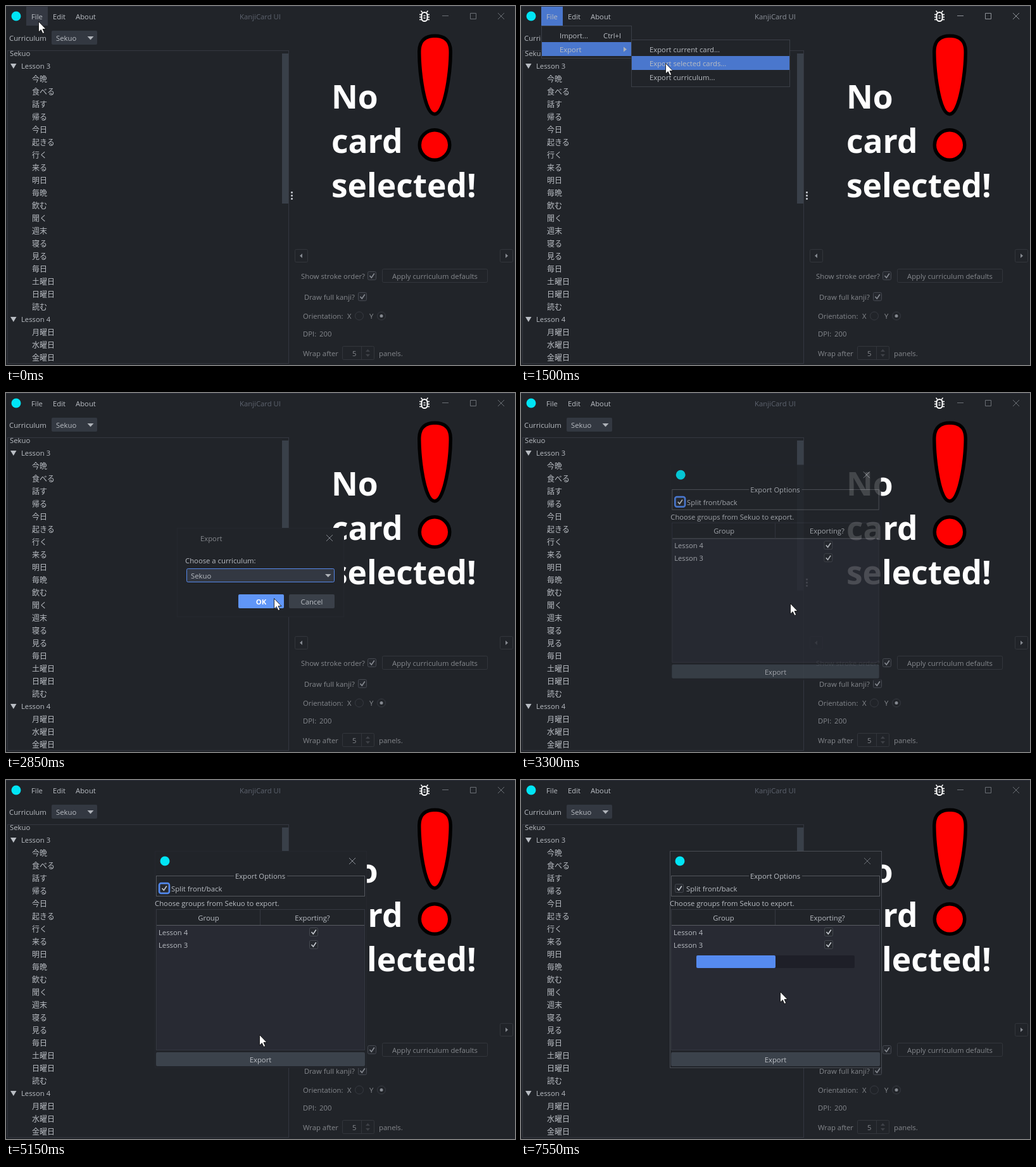
These frames come from a looping animation (804x567 px, 8000 ms). An HTML page:

```html
<!DOCTYPE html>
<html lang="en">
<head>
<meta charset="utf-8">
<title>KanjiCard UI</title>
<style>
html, body { margin: 0; height: 100%; overflow: hidden; background: #212429; }
svg { display: block; width: 804px; height: 567px; }
text { font: 11.3px "Open Sans", "Noto Sans", sans-serif; fill: #b9bdc3; white-space: pre; }
.jp { font: 12px "Noto Sans CJK JP", "Noto Sans CJK", sans-serif; }
.big { font: bold 51.5px "Noto Sans", sans-serif; fill: #fff; }
.off text, text.off { fill: #85888d; }
.bold { font-weight: bold; fill: #fff; }
.mid { text-anchor: middle; }
.line { fill: none; stroke: #b9bdc3; }
</style>
</head>
<body>
<svg id="stage" viewBox="0 0 804 567"></svg>
<script>
const CURRICULUM = 'Sekuo', BG = '#212429', BLUE = '#4a77cd';

// Markup helpers
const box = (x, y, w, h, fill, stroke, rx = 0, id = '') => {
  const d = stroke ? .5 : 0;
  return `<rect id="${id}" x="${x + d}" y="${y + d}" width="${w - 2 * d}" height="${h - 2 * d}" rx="${rx}" fill="${fill}" stroke="${stroke || 'none'}"/>`;
};
const text = (x, y, s, cls = '', id = '') => `<text id="${id}" x="${x}" y="${y}" class="${cls}">${s}</text>`;
const shape = (d, fill = '#aeb2b8') => `<path d="${d}" fill="${fill}"/>`;
const line = (d, color = '#b9bdc3', w = 1, id = '') => `<path id="${id}" class="line" d="${d}" style="stroke:${color};stroke-width:${w}"/>`;
const cross = (x, y, color, id) => line(`M${x - 5} ${y - 5}l10 10m0-10l-10 10`, color, 1, id);
const tick = (x, y, color = '#c4c8ce') => box(x, y, 14, 14, '#25282e', '#454950', 2) + line(`M${x + 3.5} ${y + 7}l2.8 3.2 4.5-6.6`, color, 1.7);
const group = (id, s, cls = '') => `<g id="${id}" class="${cls}">${s}</g>`;
const logo = (x, y) => `<circle cx="${x}" cy="${y}" r="7.5" fill="#00e5f5"/>`;

const words = ['今晩 食べる 話す 帰る 今日 起きる 行く 来る 明日 毎晩 飲む 聞く 週末 寝る 見る 毎日 土曜日 日曜日 読む',
  '月曜日 水曜日 金曜日'];
let rowY = 99;
const tree = words.map((list, i) => {
  let s = shape(`M7 ${rowY - 8}h9.5l-4.7 8z`, '#b9bdc3') + text(24, rowY, 'Lesson ' + (i + 3));
  for (const word of list.split(' ')) s += text(41, (rowY += 20) + .5, word, 'jp');
  rowY += 20;
  return s;
}).join('');

const topBar = line('M0 .5H804', '#2c2f3a') + logo(16, 16) +
  box(32, 1, 34, 30, '#343842', '', 0, 'fileBg') +
  text(40, 21, 'File') + text(74, 21, 'Edit') + text(110, 21, 'About') + text(401.5, 21, 'KanjiCard UI', 'mid', 'title') +
  line('M689 15.5h10M733.5 11.5h9v9h-9zM777 11l10 10m0-10l-10 10', '#6b6f75', 1, 'controls') +
  line('M657.5 10l-2-2.5M664.500 10l2-2.500M653 13.500h3.500m9 0h3.500M653 17.500h3.500m9 0h3.500M653 21.500h3.500m9 0h3.500M659.500 15.500h3M659.500 19h3', '#fff', 1.500) +
  '<rect x="656.500" y="10" width="9" height="14" rx="4.500" fill="none" stroke="#fff" stroke-width="2"/>';

const leftPane = text(5, 55, 'Curriculum') + box(72, 39, 72, 22, '#333841', '', 2) + text(79, 55, CURRICULUM) + shape('M128.500 48h10l-5 5.500z') +
  box(2, 70, 445, 495, 'none', '#343740') +
  `<clipPath id="list"><path d="M3 71h443v493H3z"/></clipPath><g clip-path="url(#list)">${text(6, 79, CURRICULUM)}${tree}</g>` +
  box(436, 75, 10, 237, '#394049') +
  [293, 298, 303].map(y => box(450, y, 3, 3, '#b9bdc3', '', 1)).join('');

const preview = ['No', 'card', 'selected!'].map((s, i) => text(514, 161.500 + 70 * i, s, 'big')).join('') +
  `<g fill="red" stroke="#000" stroke-width="11" style="paint-order:stroke">
  <path d="M655.500 72C655.500 55 665 50 677.500 50S699.500 55 699.500 72C699.500 110 689 168 677 168S655.500 110 655.500 72z"/>
  <circle cx="677" cy="219.500" r="21"/></g>`;

const dim = '#33363c', faint = '#858990';
const form = box(456, 384, 21, 21, 'none', dim, 2) + shape('M468 391v7l-4-3.500z', faint) +
  box(780, 384, 21, 21, 'none', dim, 2) + shape('M789 391v7l4-3.500z', faint) +
  text(466, 431, 'Show stroke order?') + tick(571, 419, faint) +
  box(594, 415, 167, 22, 'none', dim, 2) + text(677.500, 431, 'Apply curriculum defaults', 'mid') +
  text(471, 464, 'Draw full kanji?') + tick(556, 452, faint) +
  text(469, 494, 'Orientation:') + text(539, 494, 'X') + text(574, 494, 'Y') +
  `<g fill="none" stroke="#373a41"><circle cx="558" cy="489.500" r="6.500"/><circle cx="593" cy="489.500" r="6.500"/></g><circle cx="593" cy="489.500" r="2.500" fill="${faint}"/>` +
  text(469, 522, 'DPI:') + text(495, 522, '200') +
  text(469, 553, 'Wrap after') + box(531, 537, 51, 22, 'none', dim, 2) + line('M561.500 538v20', dim) +
  text(547, 553, '5') + shape('M568 546h7l-3.500-4zM568 550h7l-3.500 4z', '#3e4147') + text(589, 553, 'panels.');

const menu = box(32, 31, 143, 52, BG, '#3b3f47') + box(33, 35, 141, 22, BLUE, '', 0, 'menuRow') +
  text(61, 51, 'Import...') + text(130, 51, 'Ctrl+I') + text(61, 73, 'Export') + shape('M162 64.500v8l5-4z');

const submenu = box(174, 53, 251, 75, BG, '#3b3f47') + box(175, 57, 249, 22, BLUE, '', 0, 'subRow') +
  ['Export current card...', 'Export selected cards...', 'Export curriculum...'].map((s, i) => text(203, 73 + 22 * i, s)).join('');

const chooser = box(270, 213, 264, 141, BG, '#25272e') + text(307, 234, 'Export', 'off', 'chooserTitle') + cross(511, 229, '#858990') +
  text(283, 269, 'Choose a curriculum:') + box(285, 277, 234, 22, '#333842', '#5688ea', 2) +
  text(292, 293, CURRICULUM) + shape('M504 286h9.500l-4.700 5z') +
  box(367, 318, 72, 22, '#5688ea', '', 2, 'ok') + text(403, 334, 'OK', 'mid bold') +
  box(447, 318, 72, 22, '#3a4049', '', 2) + text(483, 334, 'Cancel', 'mid');

const options = box(235, 112, 335, 343, BG, '#25272e', 0, 'frame') + logo(251, 128) + cross(547, 128, '#8d9198', 'optClose') +
  box(237, 151, 330, 33, 'none', '#54575d') + box(360, 150, 84, 4, BG) + text(401.500, 156, 'Export Options', 'mid') +
  tick(243, 164) + group('focus', '<rect x="242" y="163" width="16" height="16" rx="3" fill="none" stroke="#5088f0" stroke-width="2.500"/>') +
  text(261, 176, 'Split front/back') + text(235, 199, `Choose groups from ${CURRICULUM} to export.`) +
  box(237, 204, 330, 223, '#282a33', '#353841') + box(238, 205, 328, 24, BG) +
  line('M238 229.500h328', '#595c62') + line('M401.500 205v24', '#353841') +
  text(320, 222, 'Group', 'mid') + text(484, 222, 'Exporting?', 'mid') +
  text(241, 245, 'Lesson 4') + tick(479, 233) + text(241, 265, 'Lesson 3') + tick(479, 253) +
  box(237, 430, 330, 22, '#3b424b', '', 2, 'export') + text(402, 446, 'Export', 'mid') +
  group('progress', box(277, 277, 250, 20, '#1e1f28', '', 2) + box(277, 277, 125, 20, '#568bf0', '', 2));

const pointer = '<path d="M.500 .500V17l3.800-3.500 2.700 6 2.700-1.200-2.700-5.800H12z" fill="#fff" stroke="#000" stroke-width=".8"/>';

document.getElementById('stage').innerHTML = box(0, 0, 804, 567, BG) + topBar + leftPane + preview + group('form', form, 'off') +
  group('menu', menu) + group('submenu', submenu) + group('chooser', chooser) + group('options', options) + group('pointer', pointer);

// Pointer path: time, x, y
const path = [[0, 51, 24], [650, 51, 24], [850, 56, 53], [950, 79, 60], [1050, 79, 60], [1350, 190, 64], [1600, 253, 108],
  [2350, 253, 108], [2850, 423, 324], [2900, 423, 324], [2950, 425, 332], [3600, 425, 332], [3900, 511, 269],
  [4100, 511, 269], [4250, 466, 300], [4600, 420, 436], [5100, 420, 436], [5500, 262, 165], [5850, 340, 425],
  [5950, 392, 436], [6150, 406, 442], [6900, 406, 442], [7350, 409, 335], [7500, 409, 335], [7550, 409, 334], [8000, 409, 334]];

const el = id => document.getElementById(id);
const set = (id, name, value) => el(id).setAttribute(name, value);
const show = (id, on) => el(id).style.display = on ? '' : 'none';
const clamp = v => Math.max(0, Math.min(1, v));
const easeIn = (t, start) => 1 - (1 - clamp((t - start) / 250)) ** 2;

function pointerAt(t) {
  const i = path.findIndex(p => p[0] > t), a = path[i - 1], b = path[i];
  const k = (t - a[0]) / (b[0] - a[0]);
  return [1, 2].map(n => Math.round(a[n] + (b[n] - a[n]) * k));
}

// Windows grow slightly while they fade in
function fade(id, alpha, cy) {
  show(id, alpha > 0);
  set(id, 'opacity', alpha);
  set(id, 'transform', `translate(402 ${cy}) scale(${.95 + .05 * alpha}) translate(-402 ${-cy})`);
}

function draw(now) {
  const t = Math.floor(now % 8000 / 50) * 50;
  const [x, y] = pointerAt(t);
  const within = (l, top, r, b) => x >= l && x < r && y >= top && y < b;
  const open = t >= 600 && t < 1900, active = open || t >= 3000 && t < 3150;

  set('pointer', 'transform', `translate(${x} ${y})`);
  show('fileBg', t < 1900);
  set('fileBg', 'fill', open ? BLUE : '#343842');
  el('title').style.fill = active ? '#8d929a' : '#5d636e';
  el('controls').style.stroke = active ? '#90949a' : '#6b6f75';

  show('menu', open);
  show('menuRow', y >= 34);
  set('menuRow', 'y', t >= 900 ? 57 : 35);
  show('submenu', open && t >= 1100);
  show('subRow', x >= 174);
  set('subRow', 'y', y < 78 ? 57 : y < 100 ? 79 : 101);

  fade('chooser', easeIn(t, 1900) * clamp((3150 - t) / 150), 283.5);
  set('chooserTitle', 'x', t < 2200 ? 279 : 307);
  set('ok', 'fill', within(367, 317, 439, 340) ? '#6096f7' : '#5688ea');

  fade('options', easeIn(t, 3150), 283.5);
  const busy = t >= 6300;
  set('frame', 'stroke', busy ? '#484c53' : '#25272e');
  el('optClose').style.stroke = busy ? '#6b6f75' : '#8d9198';
  show('focus', t < 6000);
  show('progress', busy);
  set('export', 'fill', within(237, 429, 567, 452) ? '#454d57' : '#3b424b');
}

const start = performance.now();
function loop() {
  draw(performance.now() - start);
  requestAnimationFrame(loop);
}
loop();
</script>
</body>
</html>
```
